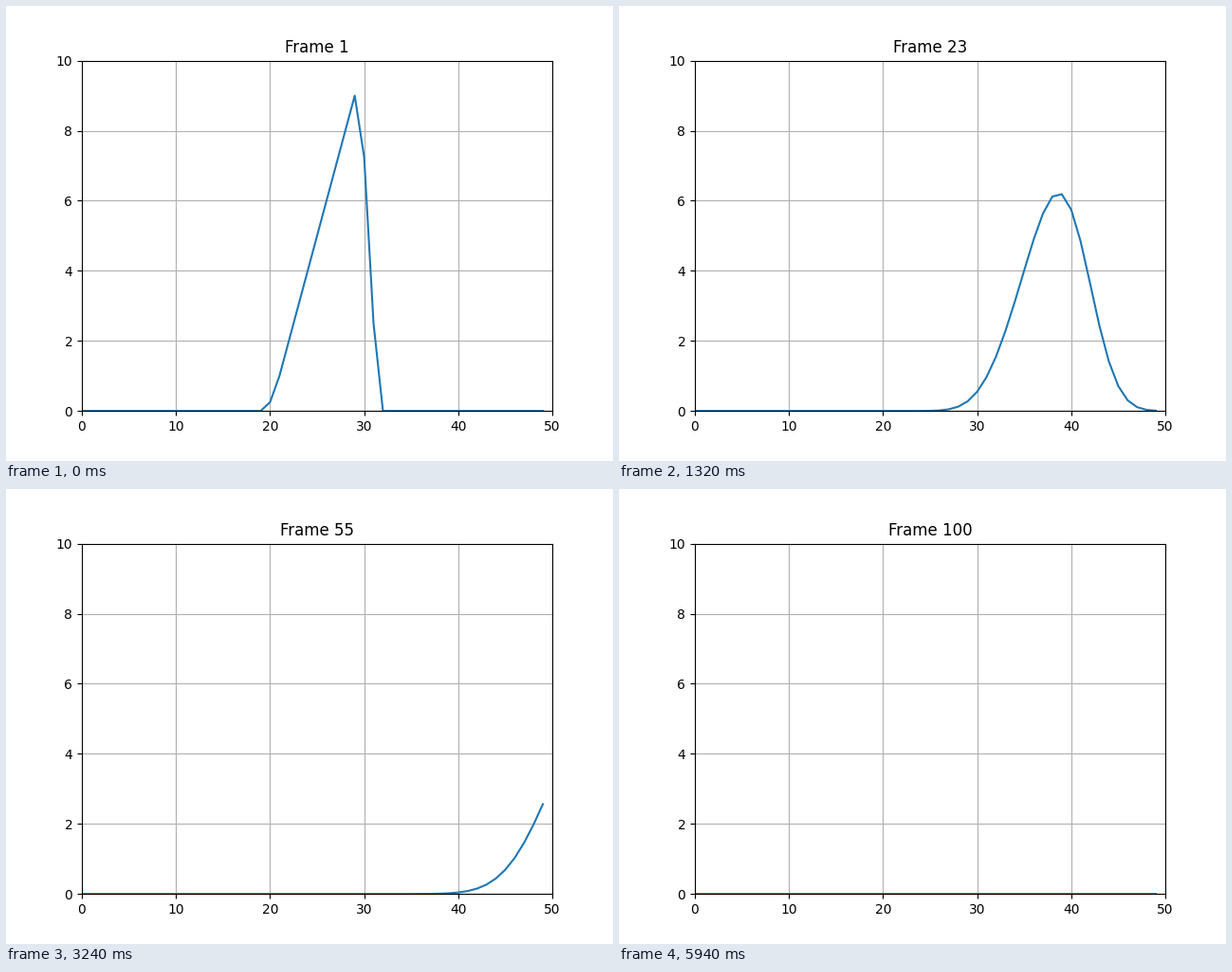
Recreate the animation shown at these times as a matplotlib script. Size 640 by 480 pixels, loop 6000 ms.

```python
import numpy as np
import matplotlib.pyplot as plt
from matplotlib.animation import FuncAnimation

CELLS = 50
FRAMES = 100
COURANT = 0.5


def sawtooth():
    u = np.zeros(CELLS)
    u[20:30] = np.arange(1, 11)
    return u


def advect(u):
    """One upwind step of a wave moving to the right."""
    new = u.copy()
    new[1:] -= COURANT * (u[1:] - u[:-1])
    return new


# The first picture already shows the wave after two steps.
waves = [advect(advect(sawtooth()))]
while len(waves) < FRAMES:
    waves.append(advect(waves[-1]))

plt.rcParams["font.family"] = "DejaVu Sans"
fig, ax = plt.subplots(figsize=(6.4, 4.8), dpi=100)
ax.set_xlim(0, 50)
ax.set_ylim(0, 10)
ax.grid(True)
line, = ax.plot(np.arange(CELLS), waves[0])
title = ax.set_title("Frame 1")


def update(i):
    line.set_ydata(waves[i])
    title.set_text(f"Frame {i + 1}")
    return line, title


anim = FuncAnimation(fig, update, frames=FRAMES, interval=60,
                     repeat=True, repeat_delay=0, blit=False)
plt.show()
```
